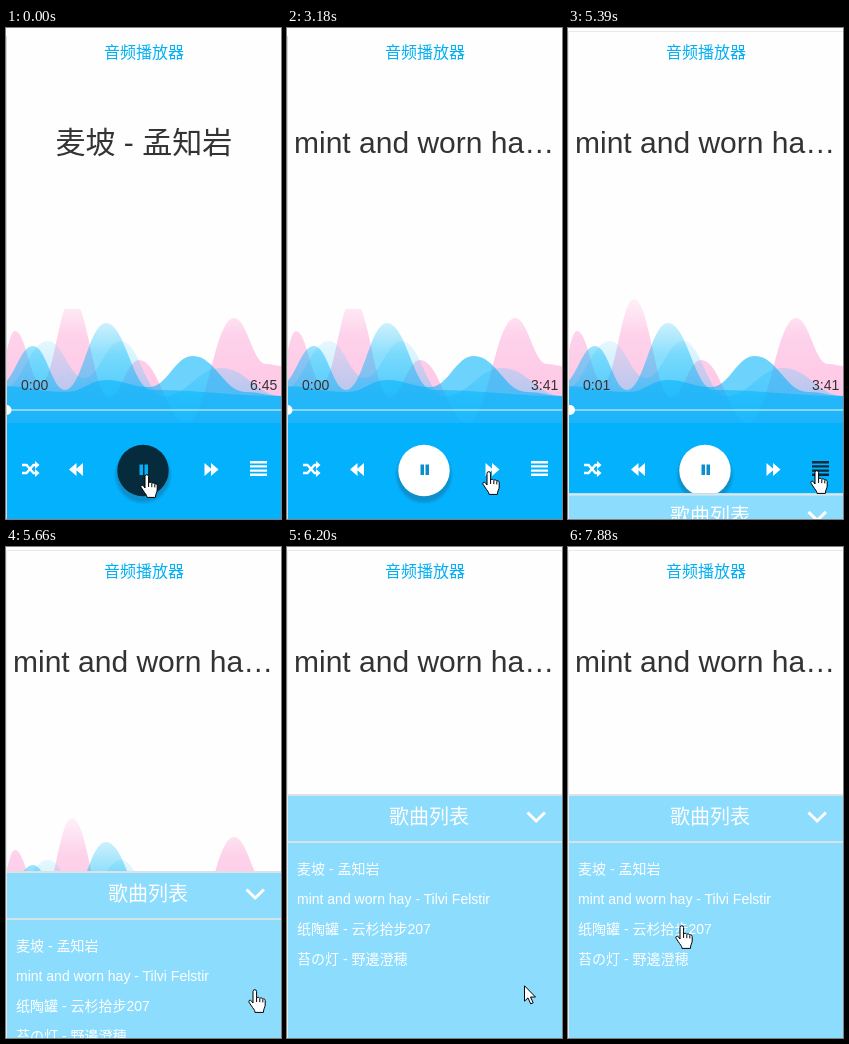
An HTML page for the animation above (8000 ms loop, 275 by 491 pixels).

```html
<!DOCTYPE html>
<html lang="zh">
<head>
<meta charset="utf-8">
<title>音频播放器</title>
<style>
  html, body { margin: 0; width: 100%; height: 100%; overflow: hidden; background: #fefefe; }
  svg { display: block; }
  text { font-family: "Liberation Sans", "Noto Sans CJK SC", "Noto Sans CJK", sans-serif; white-space: pre; }
  .time { font-size: 14px; fill: #333; }
  .icon { fill: #fff; }
  .icon.on { fill: #052b3c; }
  #song { font-size: 30px; fill: #333; }
  #panel text { font-size: 14px; fill: #fff; }
  #panel .head { font-size: 20px; }
</style>
</head>
<body>
<svg width="275" height="491" viewBox="0 0 275 491">
  <defs>
    <linearGradient id="pink" gradientUnits="userSpaceOnUse" x1="0" y1="271" x2="0" y2="395">
      <stop offset="0" stop-color="#ff9ad2" stop-opacity=".14"/>
      <stop offset=".3" stop-color="#ff9ad2" stop-opacity=".44"/>
      <stop offset="1" stop-color="#ff9ad2" stop-opacity=".6"/>
    </linearGradient>
    <linearGradient id="pale" gradientUnits="userSpaceOnUse" x1="0" y1="312" x2="0" y2="395">
      <stop offset="0" stop-color="#3cc8ff" stop-opacity=".12"/>
      <stop offset="1" stop-color="#3cc8ff" stop-opacity=".5"/>
    </linearGradient>
    <linearGradient id="cyan" gradientUnits="userSpaceOnUse" x1="0" y1="293" x2="0" y2="395">
      <stop offset="0" stop-color="#00b8fa" stop-opacity=".18"/>
      <stop offset=".33" stop-color="#00b8fa" stop-opacity=".45"/>
      <stop offset="1" stop-color="#00b0fc" stop-opacity=".6"/>
    </linearGradient>
    <linearGradient id="blue" gradientUnits="userSpaceOnUse" x1="0" y1="328" x2="0" y2="395">
      <stop offset="0" stop-color="#00b4fa" stop-opacity=".58"/>
      <stop offset="1" stop-color="#00b0fc" stop-opacity=".55"/>
    </linearGradient>
    <filter id="soft" x="-20%" y="-20%" width="140%" height="140%"><feGaussianBlur stdDeviation=".8"/></filter>
    <clipPath id="clip"><rect id="clipBox" width="275" height="395"/></clipPath>
  </defs>

  <text x="138" y="30" text-anchor="middle" font-size="16" fill="#04b0f4">音频播放器</text>
  <text id="song" y="125"></text>

  <g id="waves" clip-path="url(#clip)"></g>
  <rect y="395" width="275" height="96" fill="#03b1fd"/>

  <text id="now" class="time" x="15" y="362"></text>
  <text id="total" class="time" x="244" y="362"></text>
  <rect y="381" width="275" height="2" fill="#fff" opacity=".45"/>
  <circle id="knob" cy="382" r="5" fill="#fff"/>

  <g class="icon">
    <path d="M16 437h4.5l7 8H30" fill="none" stroke="#fff" stroke-width="2.4"/>
    <path d="M16 445h4.5l7-8H30" fill="none" stroke="#fff" stroke-width="2.4"/>
    <path d="M29 433l4.5 4-4.5 4zM29 441l4.5 4-4.5 4z"/>
  </g>
  <path class="icon" d="M70.5 435v13l-7.5-6.5zM77 435v13l-7.5-6.5z"/>
  <path id="next" class="icon" d="M198.5 435v13l7.5-6.5zM205 435v13l7.5-6.5z"/>
  <path id="list" class="icon" d="M244 433h17v2.4h-17zM244 437.2h17v2.4h-17zM244 441.4h17v2.4h-17zM244 445.6h17v2.4h-17z"/>

  <circle cx="137" cy="447" r="27.5" fill="#0a90cc" filter="url(#soft)"/>
  <circle id="disc" cx="137" cy="442.5" r="25.7"/>
  <path id="bars" d="M133.5 436.5h3.5v10.5h-3.5zM138.5 436.5h3.5v10.5h-3.5z"/>

  <g id="panel">
    <rect y="-1" width="275" height="2" fill="#dde3e6"/>
    <rect y="1" width="275" height="260" fill="#8cdcfe"/>
    <rect y="46" width="275" height="2" fill="#d3e4ec"/>
    <text class="head" x="102" y="29">歌曲列表</text>
    <path d="M240.5 17.500l8.700 8.500 8.700-8.500" fill="none" stroke="#fff" stroke-width="3"/>
  </g>

  <path id="edge" fill="none"/>
  <g id="arrow" fill="#fff" stroke="#000">
    <path d="M.5 .8V16.2l3.5-3.3 2.700 6 2.500-1.100-2.700-5.800h5z"/>
  </g>
  <g id="hand" fill="#fff" stroke="#000">
    <path d="M5 14V2.5a1.8 1.8 0 0 1 3.6 0V9c.4-1 3-.9 3.2.5.5-1 2.8-.7 3 .8.6-.8 2.4-.4 2.4 1.200V16c0 2-1.800 4-1.800 7.400H7c0-2.400-2.300-4.300-3.600-6.600L1 13.200c-.8-1.600 1-2.700 2.300-1.500z"/>
    <path d="M8.6 9v4M11.8 9.8v3.4M14.8 10.6v2.8" fill="none"/>
  </g>
</svg>
<script>
const $ = id => document.getElementById(id);
const LOOP = 8000, SLIDE_AT = 5290, SLIDE = 920;
const songs = [
  '麦坡 - 孟知岩',
  'mint and worn hay - Tilvi Felstir',
  '纸陶罐 - 云杉拾步207',
  '苔の灯 - 野邊澄穂'
];

function add(parent, tag, attrs, text) {
  const el = document.createElementNS('http://www.w3.org/2000/svg', tag);
  for (const k in attrs) el.setAttribute(k, attrs[k]);
  if (text) el.textContent = text;
  parent.append(el);
}

// Smooth curve through crests and troughs, filled down to the control bar.
function wave(fill, pts) {
  let d = `M${pts[0]}`;
  for (let i = 1; i < pts.length; i++) {
    const [x0, y0] = pts[i - 1], [x1, y1] = pts[i], h = (x1 - x0) * 0.42;
    d += `C${x0 + h} ${y0} ${x1 - h} ${y1} ${x1} ${y1}`;
  }
  add($('waves'), 'path', { d: d + 'V395H0Z', fill: `url(#${fill})` });
}
wave('pink', [[-8, 345], [9, 303], [35, 355], [66, 271], [103, 369], [133, 332], [181, 395], [228, 290], [260, 336], [276, 338]]);
wave('pale', [[-4, 362], [42, 313], [78, 350], [115, 313], [158, 368], [215, 340], [276, 368]]);
wave('cyan', [[-6, 356], [27, 318], [59, 362], [100, 295], [146, 362], [276, 368]]);
wave('blue', [[-6, 358], [60, 364], [100, 352], [143, 359], [187, 328], [240, 364], [276, 368]]);

songs.forEach((s, i) => add($('panel'), 'text', { x: 10, y: 79 + 30 * i }, s));

const slide = $('panel').animate(
  [{ transform: 'translateY(493px)' }, { transform: 'translateY(248px)' }],
  { duration: SLIDE, easing: 'ease', fill: 'both' });
slide.pause();

// Each step holds until the next one; only what changes is listed.
const steps = [
  { at: 0, cur: ['hand', 134, 446], song: 0, sec: 0, knob: 0.5, total: '6:45', hot: 'disc', open: false },
  { at: 280, sec: 1 },
  { at: 1280, sec: 2, knob: 2 },
  { at: 2220, cur: ['arrow', 165, 444] },
  { at: 2340, cur: ['arrow', 199, 446], sec: 3, knob: 2.5, hot: 'next' },
  { at: 2620, cur: ['hand', 195, 443] },
  { at: 2900, song: 1, sec: 0, total: '3:41', hot: '' },
  { at: 3180, knob: 0.5 },
  { at: 4170, sec: 1, knob: 2 },
  { at: 4600, cur: ['arrow', 241, 444] },
  { at: 4750, cur: ['hand', 242, 442], hot: 'list' },
  { at: 5150, open: true },
  { at: 5270 }, { at: 5390 }, { at: 5540 }, { at: 5660 }, { at: 5810 }, { at: 5960 },
  { at: 6080, cur: ['arrow', 237, 438] },
  { at: 6200 }, { at: 6320 },
  { at: 6600, cur: ['arrow', 202, 423] },
  { at: 6750, cur: ['arrow', 137, 394] },
  { at: 6900, cur: ['hand', 119, 384] },
  { at: 7330, cur: ['hand', 112, 398] },
  { at: 7460, cur: ['hand', 107, 410] },
  { at: 7610, cur: ['hand', 107, 408] },
  { at: 7760, cur: ['hand', 107, 390] },
  { at: 7880, cur: ['hand', 107, 378] }
];
for (let i = 1; i < steps.length; i++) steps[i] = { ...steps[i - 1], ...steps[i] };

function show(s) {
  const first = s.song === 0;
  $('song').textContent = first ? songs[0] : songs[1].slice(0, 16) + '…';
  $('song').setAttribute('x', first ? 49.5 : 7);
  $('now').textContent = '0:0' + s.sec;
  $('total').textContent = s.total;
  $('knob').setAttribute('cx', s.knob);
  $('disc').setAttribute('fill', s.hot === 'disc' ? '#052b3c' : '#fff');
  $('bars').setAttribute('fill', s.hot === 'disc' ? '#04b0f8' : '#0a8fcc');
  for (const id of ['next', 'list']) $(id).classList.toggle('on', s.hot === id);
  $('clipBox').setAttribute('y', s.open ? 0 : 281);
  $('edge').setAttribute('d', s.open ? 'M275 3.5H.5V491' : 'M.5 8V491');
  $('edge').setAttribute('stroke', s.open ? '#e9e9e9' : '#d6d6d6');
  $('panel').style.visibility = s.open ? 'visible' : 'hidden';
  slide.currentTime = Math.min(SLIDE, Math.max(0, s.at - SLIDE_AT));
  const [kind, x, y] = s.cur;
  for (const id of ['arrow', 'hand']) $(id).style.display = id === kind ? '' : 'none';
  $(kind).setAttribute('transform', `translate(${x} ${y})`);
}

const start = performance.now();
let last;
function tick() {
  const t = (performance.now() - start) % LOOP;
  const s = steps.findLast(s => s.at <= t);
  if (s !== last) show(last = s);
  requestAnimationFrame(tick);
}
tick();
</script>
</body>
</html>
```
